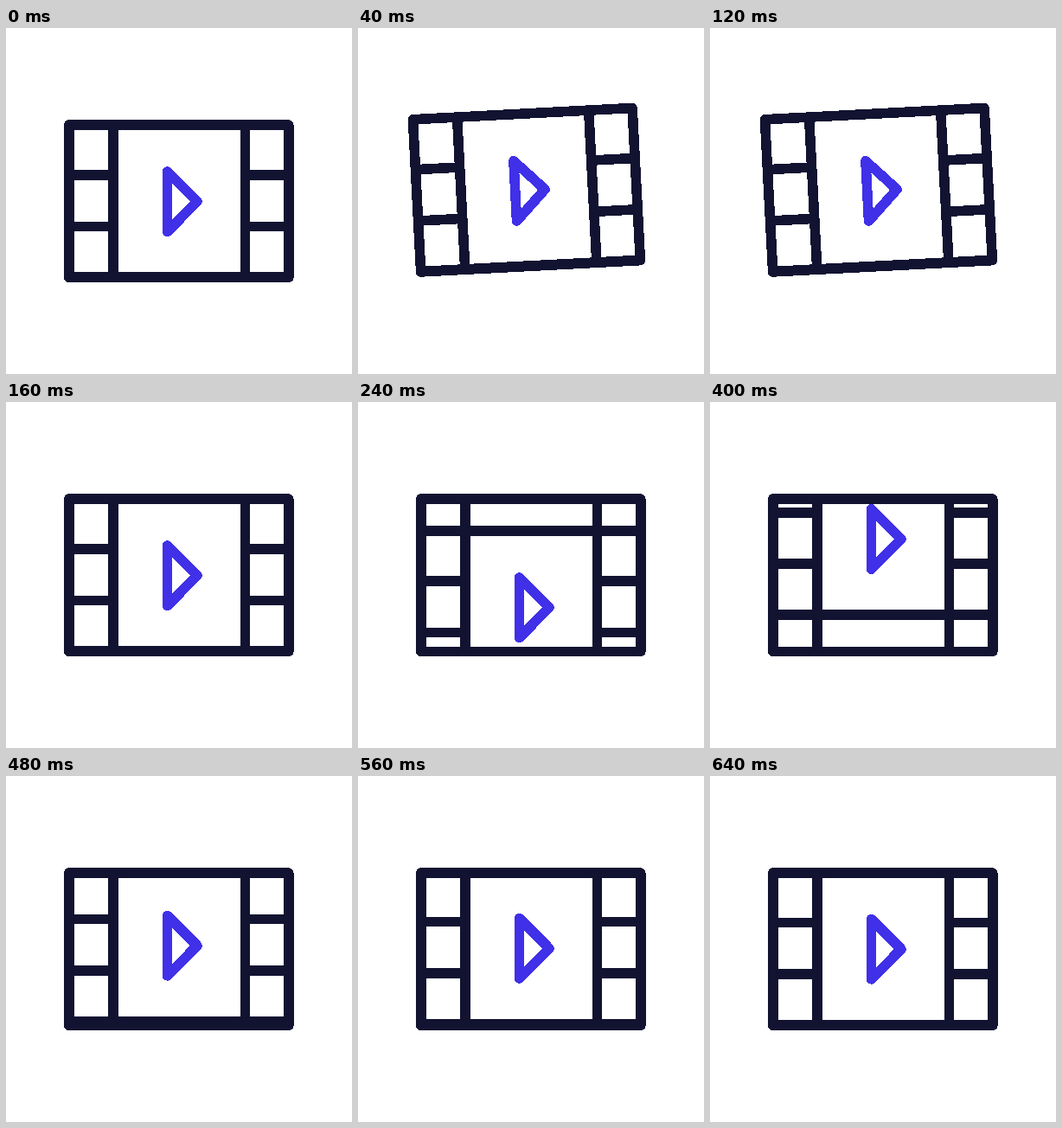
These frames come from a looping animation (400 by 400 pixels, 0.72 s). An HTML page:

```html
<!DOCTYPE html>
<html lang="en">
<head>
<meta charset="utf-8">
<title>Film strip</title>
<style>
  html, body { margin: 0; width: 100%; height: 100%; overflow: hidden; background: #fff; }
  svg { display: block; width: 100vw; height: 100vh; }
  .ink { fill: none; stroke: #121331; stroke-width: 11.6; stroke-linejoin: round; }
  .play { fill: none; stroke: #4030e8; stroke-width: 11.6; stroke-linejoin: round; }
</style>
</head>
<body>
<svg viewBox="0 0 400 400" shape-rendering="crispEdges">
  <defs>
    <clipPath id="gate"><rect x="72" y="112" width="255" height="176.4"/></clipPath>
    <g id="cell">
      <path class="play" d="M186.6 166V235.4L221 200.6Z"/>
      <path class="ink" d="M73 112H327M73 170H124M276 170H327M73 229.4H124M276 229.4H327"/>
    </g>
  </defs>
  <g id="film">
    <g clip-path="url(#gate)">
      <g id="strip">
        <use href="#cell"/>
        <use href="#cell" y="-176"/>
        <use href="#cell" y="176"/>
      </g>
    </g>
    <path class="ink" d="M72.8 112H326.8V288.4H72.8ZM124 112V288M276.3 112V288"/>
  </g>
</svg>
<script>
  const LOOP = 720, STEP = 40, HOP_END = 160;
  const film = document.getElementById('film');
  const strip = document.getElementById('strip');

  // Time and distance: short ease in, steady run, short ease out, slow settle.
  const roll = [
    [160, 0], [200, 13], [240, 37], [440, 158], [480, 171.5],
    [520, 173.6], [560, 174.6], [600, 175.1], [640, 175.5]
  ];

  function along(keys, t) {
    if (t <= keys[0][0]) return keys[0][1];
    for (let i = 1; i < keys.length; i++) {
      const [t0, a] = keys[i - 1], [t1, b] = keys[i];
      if (t < t1) return a + (b - a) * (t - t0) / (t1 - t0);
    }
    return keys[keys.length - 1][1];
  }

  function draw(ms) {
    const t = Math.floor((ms % LOOP) / STEP) * STEP;
    const u = Math.min(t / HOP_END, 1);
    const hop = 4 * u * (1 - u);
    film.setAttribute('transform', `translate(0 ${-17.5 * hop}) rotate(${-4 * hop} 200 294)`);
    strip.setAttribute('transform', `translate(0 ${along(roll, t)})`);
  }

  const start = performance.now();
  function tick(now) {
    draw(Math.max(0, now - start));
    requestAnimationFrame(tick);
  }
  draw(0);
  requestAnimationFrame(tick);
</script>
</body>
</html>
```
